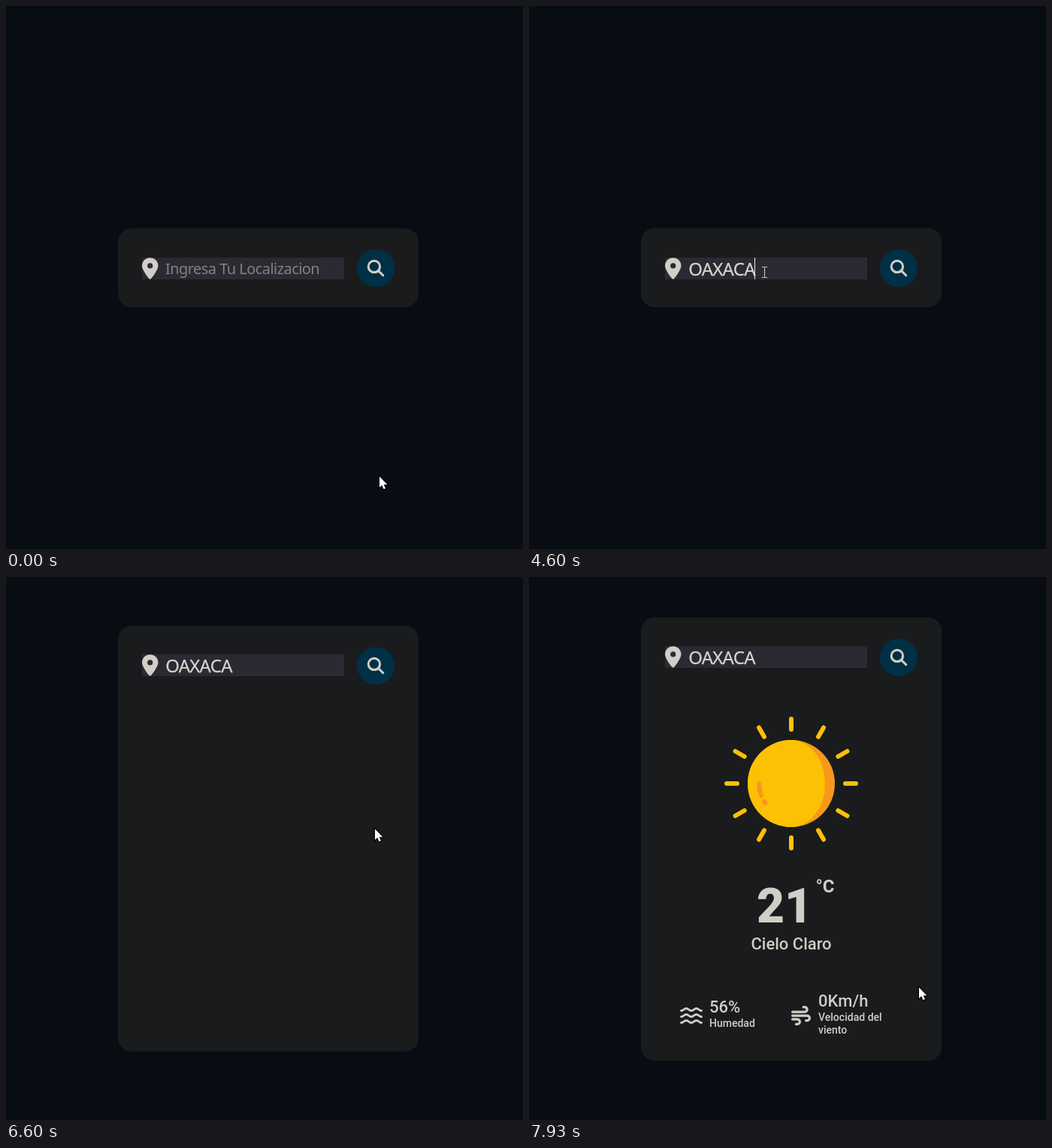
Animation of 688x723 px, one loop 8 s. Source, as an HTML page:

```html
<!DOCTYPE html>
<html lang="es">
<head>
<meta charset="utf-8">
<title>Clima</title>
<style>
  html, body { margin: 0; height: 100%; overflow: hidden; background: #080d14; }
  svg { display: block; width: 688px; height: 723px; }
  .field { font-family: "Noto Sans", "Open Sans", sans-serif; }
  #hint { font-size: 20px; letter-spacing: -.55px; fill: #84817f; }
  #typed { font-size: 24px; letter-spacing: -.75px; fill: #d8d4ce; stroke: #d8d4ce; stroke-width: .25px; }
  .info { font: 500 22px Roboto, sans-serif; fill: #d1cdc7; }
  .info .small { font-size: 14px; }
  .info .temp { font-size: 64px; font-weight: 900; }
  .info .unit { font-size: 24px; font-weight: 700; }
  .icon { fill: none; stroke: #d1cdc7; stroke-linecap: round; }
</style>
</head>
<body>
<svg viewBox="0 0 688 723" xmlns="http://www.w3.org/2000/svg">
  <rect width="688" height="723" fill="#080d14"/>
  <rect id="card" x="149" width="400" rx="18" fill="#1a1b1c"/>

  <g id="input">
    <rect x="181" width="269" height="29" fill="#2b2a33"/>
    <path transform="translate(181 .2) scale(.0559)" fill="#d1cdc7" fill-rule="evenodd"
      d="M216 499C267 435 384 279 384 192A192 192 0 0 0 0 192C0 279 117 435 168 499C181 515 203 515 216 499ZM192 128a64 64 0 1 1 0 128a64 64 0 1 1 0-128Z"/>
    <text id="hint" class="field" x="212" y="22">Ingresa Tu Localizacion</text>
    <text id="typed" class="field" x="212.2" y="24"></text>
    <rect id="caret" width="1" height="29" fill="#e8e6e3"/>
  </g>

  <g id="button">
    <circle id="disc" r="25"/>
    <path id="lens" class="icon" stroke-width="3" d="M5.6 0A7.7 7.7 0 1 1-9.8 0A7.7 7.7 0 1 1 5.6 0M3.4 5.5L9.8 11.9" transform="translate(0 -2.1)"/>
  </g>

  <g id="weather" class="info">
    <g transform="translate(349 275)">
      <g id="rays" stroke="#fcc103" stroke-width="6" stroke-linecap="round"></g>
      <circle r="58" fill="#f7981d"/>
      <path d="M0-58A58 58 0 0 0 0 58A45 58 0 0 0 0-58Z" fill="#fcc103"/>
      <path d="M-43 0A43 43 0 0 0-40 16M-36 24L-34.5 26" fill="none" stroke="#f7981d" stroke-width="6" stroke-linecap="round"/>
    </g>
    <text class="temp" x="303" y="460">21</text>
    <text class="unit" x="381.5" y="420">°C</text>
    <text x="349" y="496" text-anchor="middle">Cielo Claro</text>
  </g>

  <g id="details" class="info">
    <g id="waves" class="icon" stroke-width="2.8"></g>
    <text x="240" y="580">56%</text>
    <text class="small" x="240" y="599">Humedad</text>
    <path class="icon" transform="translate(349 571) scale(.0508)" stroke-width="64"
      d="M32 160H352a64 64 0 0 0 0-128h-32M32 256H416a64 64 0 0 1 0 128h-32M32 352H160a64 64 0 0 1 0 128h-32"/>
    <text x="385" y="572">0Km/h</text>
    <text class="small" x="385" y="591">Velocidad del</text>
    <text class="small" x="385" y="608">viento</text>
  </g>

  <path id="arrow" d="M0-.5V14L3.2 11L5.5 16.3L8 15.3L5.7 10.2H10.4Z" fill="#fff" stroke="#000" stroke-width="2" paint-order="stroke"/>
  <path id="beam" d="M-3-6.5H-1M1-6.5H3M-3 7.5H-1M1 7.5H3M0-6V7" fill="none" stroke="#d0cfcd" stroke-width="1" stroke-linecap="square"/>
</svg>
<script>
const LOOP = 8000, FPS = 15, OPEN = 6103;
const $ = id => document.getElementById(id);
const set = (id, attrs) => { for (const k in attrs) $(id).setAttribute(k, attrs[k]); };
const show = (id, on) => set(id, { visibility: on ? 'visible' : 'hidden' });
const lerp = (a, b, p) => a + (b - a) * p;
const mix = (a, b, p) => `rgb(${a.map((v, i) => Math.round(lerp(v, b[i], p)))})`;

function bezier(x1, y1, x2, y2) {
  const at = (a, b, s) => 3 * a * s * (1 - s) ** 2 + 3 * b * s * s * (1 - s) + s ** 3;
  return x => {
    if (x <= 0) return 0;
    if (x >= 1) return 1;
    let lo = 0, hi = 1;
    for (let i = 0; i < 24; i++) {
      const mid = (lo + hi) / 2;
      if (at(x1, x2, mid) < x) lo = mid; else hi = mid;
    }
    return at(y1, y2, lo);
  };
}
const ease = bezier(.25, .1, .25, 1), easeOut = bezier(0, 0, .58, 1);

// time, x, y
const pointer = [
  [0, 497, 627], [67, 480, 604], [133, 437, 552], [200, 385, 488], [267, 335, 426],
  [333, 303, 378], [400, 292, 350], [467, 310, 341], [600, 310, 341], [667, 316, 347],
  [733, 313, 354], [4800, 313, 354], [4867, 318, 350], [5000, 352, 331], [5200, 430, 311],
  [5400, 482, 322], [5533, 491, 336], [6600, 491, 336], [6733, 505, 390], [6867, 536, 490],
  [6933, 576, 560], [7000, 585, 578], [7067, 580, 588], [7133, 571, 589], [7467, 571, 589],
  [7600, 556, 579], [7800, 528, 556], [7933, 519, 547]
];
const typing = [[0, ''], [1870, 'O'], [1930, 'OA'], [2800, 'OAC'], [3330, 'OAX'],
  [3530, 'OAXA'], [3800, 'OAXAC'], [4000, 'OAXACA']];
const blinks = [[0, false], [870, true], [1400, false], [1870, true], [2000, false],
  [2470, true], [3000, false], [3530, true], [4130, false], [4600, true], [5130, false]];

const current = (steps, t) => steps.filter(s => s[0] <= t + 4).pop()[1];

function pointerAt(t) {
  const i = pointer.findIndex(k => k[0] > t);
  if (i < 0) return pointer[pointer.length - 1].slice(1);
  const [a, b] = [pointer[i - 1], pointer[i]], p = (t - a[0]) / (b[0] - a[0]);
  return [1, 2].map(n => Math.round(lerp(a[n], b[n], p)));
}

function appear(id, p, oy) {
  set(id, { opacity: p, transform: `translate(349 ${oy}) scale(${p}) translate(-349 ${-oy})` });
  show(id, p > 0);
}

function draw(t) {
  const h = lerp(105, 590, easeOut((t - OPEN) / 600));
  const top = 348.65 - h / 2, y = Math.round(top);
  set('card', { y, height: Math.round(top + h) - y });

  const inputY = Math.round(top + 38.4);
  set('input', { transform: `translate(0 ${inputY})` });
  const text = current(typing, t);
  $('typed').textContent = text;
  show('hint', !text);
  show('caret', current(blinks, t));
  set('caret', { x: text ? Math.floor(212.2 + $('typed').getComputedTextLength()) : 213 });

  const hover = ease((t - 5330) / 500) - ease((t - OPEN - 60) / 500);
  set('button', { transform: `translate(492 ${Math.round(top + 53)})` });
  set('disc', { fill: mix([0, 48, 69], [4, 31, 48], hover) });
  $('lens').style.stroke = mix([209, 205, 199], [240, 238, 235], hover);

  const p = ease((t - OPEN - 500) / 500);
  appear('weather', p, 317);
  appear('details', p, 582);

  const [px, py] = pointerAt(t);
  const inField = px >= 181 && px < 450 && py >= inputY && py < inputY + 29;
  show('beam', inField);
  show('arrow', !inField);
  set('beam', { transform: `translate(${px + .5} ${py})` });
  set('arrow', { transform: `translate(${px} ${py})` });
}

const list = (n, f) => Array.from({ length: n }, (_, i) => f(i)).join('');
$('rays').innerHTML = list(12, i => `<path d="M0-72V-86" transform="rotate(${i * 30})"/>`);
$('waves').innerHTML = list(3, i =>
  `<path d="M202.5 ${577.5 + i * 8}c3.4 0 3.4-3 6.75-3s3.4 3 6.75 3 3.4-3 6.75-3 3.4 3 6.75 3"/>`);

const start = performance.now();
function tick() {
  const t = (performance.now() - start) % LOOP;
  // hold each of the 15 steps per second
  draw(Math.floor((t + 4) * FPS / 1000) * 1000 / FPS);
  requestAnimationFrame(tick);
}
tick();
</script>
</body>
</html>
```
